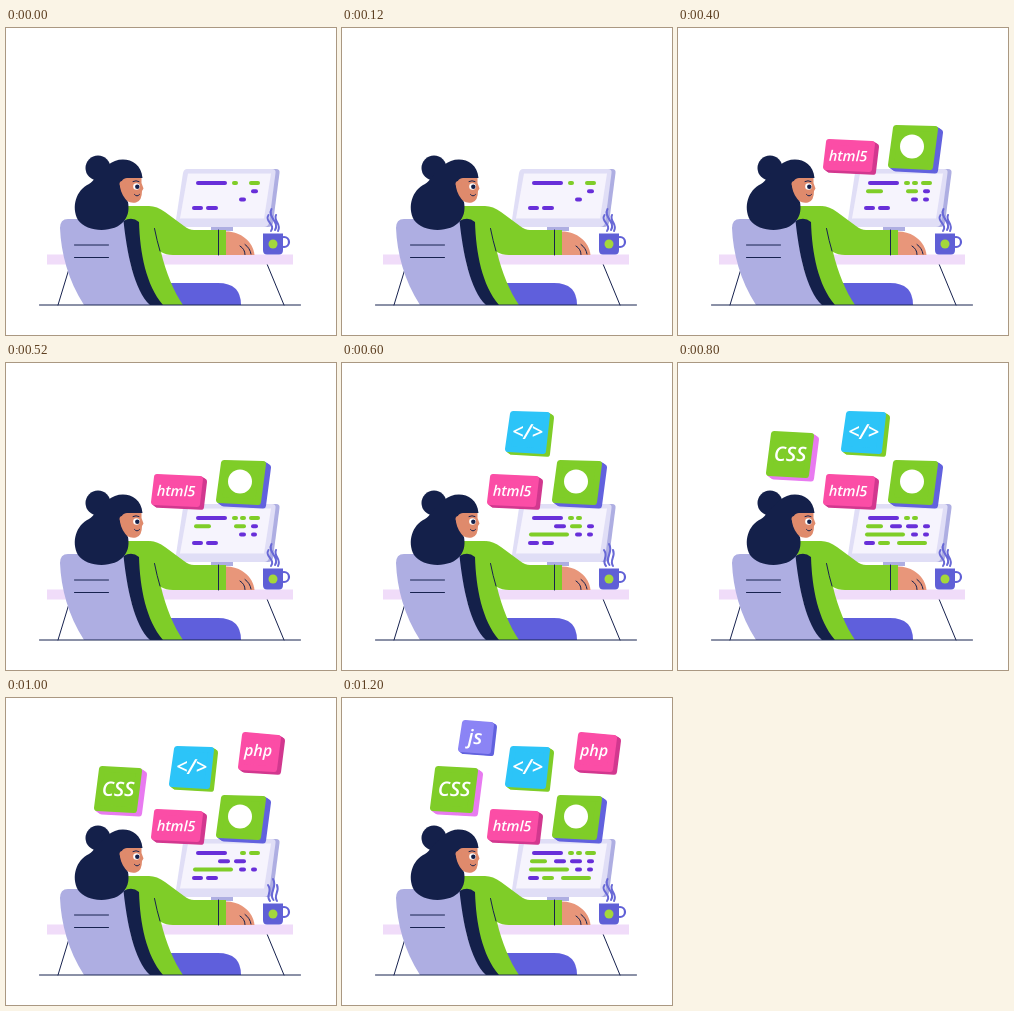
An HTML page for the animation above (1.4 s loop, 330 by 307 pixels).

```html
<!DOCTYPE html>
<html lang="en">
<head>
<meta charset="utf-8">
<style>
html, body { margin: 0; width: 100%; height: 100%; overflow: hidden; background: #fff; }
svg { display: block; width: 100%; height: 100%; }
.ink { fill: none; stroke: #17224f; stroke-width: 1; stroke-linecap: round; }
.steam { fill: none; stroke: #6868d6; stroke-width: 2; stroke-linecap: round; }
text { font: italic 600 14px "Open Sans", "Noto Sans", sans-serif; font-stretch: 87.5%; fill: #fff; text-anchor: middle; }
</style>
</head>
<body>
<svg viewBox="0 0 330 307">
  <path class="ink" d="M64.500 236L52 277M261 236L278 277"/>
  <path fill="#f0dcf9" d="M41 226.500H287V236.500H41Z"/>
  <path fill="#5f5fdc" d="M150 255H212Q235 255 235 277H150Z"/>

  <!-- monitor -->
  <path fill="#aeaee2" d="M205 197H227V203H205Z"/>
  <path fill="#aeaee2" d="M185 141H270Q274 141 273.500 145L267 195Q266 199 262 199H180Z"/>
  <path fill="#e0def6" d="M181 141H266Q270 141 269.500 145L263 195Q262 199 258 199H173Q169 199 169.500 195L177 145Q178 141 181 141Z"/>
  <path fill="#f6f4fd" d="M182 145.500H265L258 190.500H174Z"/>
  <g id="code" stroke-width="4" stroke-linecap="round"></g>

  <!-- mug -->
  <circle cx="278" cy="214" r="5" fill="none" stroke="#5f5fd6" stroke-width="2.200"/>
  <path fill="#5f5fd6" d="M257 205.500H277V222Q277 226.500 273 226.500H261Q257 226.500 257 222Z"/>
  <circle cx="267" cy="216" r="4.500" fill="#a4d83a"/>
  <path class="steam" d="M262.500 187C258 194 270 196 265 203M265.500 181C261 189 274 194 269 202M270 187C267 193 276 196 272 203"/>
  <path class="steam" d="M262 187C267 194 259 197 264 203M267 181C272 189 262 195 267.500 202M271 187C274 194 267 197 271 203"/>

  <!-- person and chair -->
  <path fill="#e8967a" d="M219 203.500C234 203 247 213 248.500 227H219Z"/>
  <path class="ink" d="M234 218Q239 221 239 226.500M239 216.500Q244 220 245 226"/>
  <path fill="#7fcd28" d="M119 178H143Q151 178 159 184L178 198Q183 202 188 202H220V227H167Q160 227 155 224C160 245 168 264 177 277H150L119 200Z"/>
  <path class="ink" d="M148.500 200.500Q151 213 154 223M212.500 202V227"/>
  <path fill="#aeaee2" d="M62 191H119C121 230 128 260 146 277H78C62 252 55 225 54 200Q54 191 62 191Z"/>
  <path fill="#14204a" d="M117.500 193Q126 188 133 194C134 225 140 257 157 277H144C128 262 121 225 117.500 193Z"/>
  <path class="ink" d="M68.500 217H102.500M68.500 229.500H102.500M33.500 277H294.500"/>
  <path fill="#df8a6c" d="M113 148H135.500V155L137.500 160.500L136 163Q136 173 130 174.500Q125 175.500 121 173V178H112Z"/>
  <circle cx="92" cy="140" r="12.500" fill="#14204a"/>
  <path fill="#14204a" d="M102 137C113 127 135 130 136.500 150H121C117 150 114 154 114 159C115 165 118 170 122 174C123 180 123 187 118 193C109 205 81 205 72 192C65 179 70 162 83 156C88 153 92 145 102 137Z"/>
  <circle cx="116.500" cy="156" r="3" fill="#df8a6c"/>
  <circle cx="130.500" cy="158.500" r="3.300" fill="#fff"/>
  <circle cx="131.300" cy="158.800" r="2.200" fill="#14204a"/>
  <path class="ink" d="M127 153.500Q130 152 133 153.500M128.500 166.500Q131 169.500 133.500 166.500"/>
  <g id="tiles"></g>
</svg>
<script>
const GREEN = '#7fcd28', PURPLE = '#682fd9', PINK = '#fb4da6', ROSE = '#d2388f', VIOLET = '#6262de';
const $ = s => document.querySelector(s);
const add = (parent, tag, attrs) => {
  const el = document.createElementNS('http://www.w3.org/2000/svg', tag);
  for (const k in attrs) el.setAttribute(k, attrs[k]);
  return parent.appendChild(el);
};

// left, right, row, colour at each step (p purple, g green, - hidden)
const dashes = [
  [190, 221, 0, 'ppppppp'], [226, 232, 0, 'ggggg-g'],
  [234, 240, 0, '--ggggg'], [243, 254, 0, 'ggg--gg'],
  [188, 205, 1, '--g-g-g'], [212, 224, 1, '---pppp'],
  [228, 240, 1, '--ggppp'], [245, 252, 1, 'ppppp-p'],
  [187, 227, 2, '---gggg'], [233, 240, 2, 'ppppppp'],
  [245, 251, 2, '--ppppp'], [186, 197, 3, 'ppppppp'],
  [200, 212, 3, 'ppppgpg'], [219, 249, 3, '----g-g']
].map(([x1, x2, row, colors]) => {
  const y = 155 + row * 8.3;
  return [add($('#code'), 'line', { x1: x1 + 2, x2: x2 - 2, y1: y, y2: y }), colors];
});

// corners, face, side, depth, label, label centre, baseline, size
const tiles = [
  ['215,97 260,98 255,142 210,140', GREEN, VIOLET, 5],
  ['148,111 197,113 194,144 145,142', PINK, ROSE, 4, 'html5', 170, 133, 14.5],
  ['168,48 208,49 204,91 163,89', '#2cc4f8', GREEN, 4, '</>', 185.5, 76, 21],
  ['93,68 136,70 131,115 88,113', GREEN, '#e87bf0', 5, 'CSS', 112, 98, 20],
  ['236,34 275,37 271,74 232,72', PINK, ROSE, 4, 'php', 252, 58, 16],
  ['120,22 152,24 149,56 116,54', '#8b84f5', VIOLET, 3, 'js', 133, 46, 20]
].map(([corners, face, side, depth, label, x, y, size]) => {
  const g = add($('#tiles'), 'g', {});
  const pts = corners.split(' ').map(p => p.split(',').map(Number));
  const cx = pts.reduce((s, p) => s + p[0], 0) / 4;
  const cy = pts.reduce((s, p) => s + p[1], 0) / 4;
  // inset the corners so the round stroke restores the full size
  const points = pts.map(p => [p[0] - 3 * Math.sign(p[0] - cx), p[1] - 3 * Math.sign(p[1] - cy)]).join(' ');
  for (let d = depth; d >= 0; d--) {
    const color = d ? side : face;
    add(g, 'polygon', {
      points, fill: color, stroke: color, 'stroke-width': 6,
      'stroke-linejoin': 'round', transform: `translate(${d} ${d * 0.7})`
    });
  }
  if (label) {
    add(g, 'text', { x, y, style: `font-size:${size}px`, transform: `rotate(1 ${x} ${y})` }).textContent = label;
  } else {
    add(g, 'circle', { cx: 234, cy: 118.5, r: 12, fill: '#fff' });
  }
  return g;
});

const steam = document.querySelectorAll('.steam');
const show = (el, on) => el.style.display = on ? '' : 'none';

function draw() {
  const step = Math.floor(performance.now() % 1400 / 200);
  tiles.forEach((tile, i) => show(tile, step > i));
  steam.forEach((s, i) => show(s, step % 2 === i));
  for (const [line, colors] of dashes) {
    show(line, colors[step] !== '-');
    line.setAttribute('stroke', colors[step] === 'g' ? GREEN : PURPLE);
  }
  requestAnimationFrame(draw);
}
draw();
</script>
</body>
</html>
```
